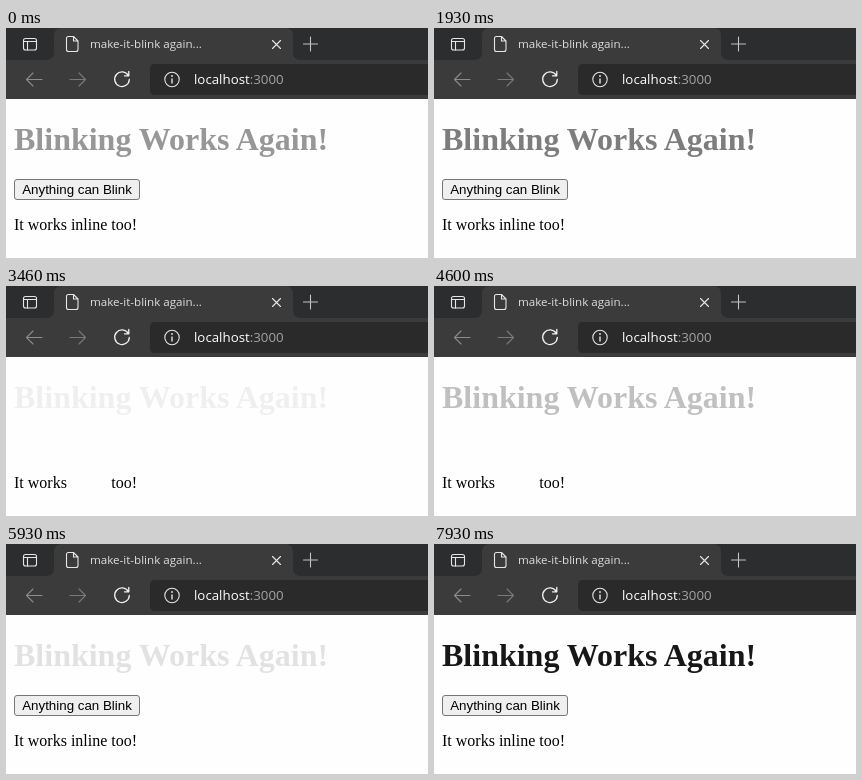
Write an HTML page that moves like this. It is 422 px wide and 230 px high and loops after 8 s.

```html
<!DOCTYPE html>
<html lang="en">
<head>
<meta charset="utf-8">
<title>make-it-blink again...</title>
<style>
  html, body { margin: 0; width: 100%; height: 100%; overflow: hidden; background: #fefefe; }
  svg { display: block; width: 422px; height: 230px; }
  .ui { font-family: "Open Sans", "Noto Sans", sans-serif; }
  .serif { font-family: "Liberation Serif", "Times New Roman", serif; }
  .sans { font-family: "Liberation Sans", Arial, sans-serif; }
  .icon { fill: none; stroke: #e6e6e6; stroke-width: 1.1; stroke-linecap: round; stroke-linejoin: round; }
</style>
</head>
<body>
<svg viewBox="0 0 422 230">
  <rect width="422" height="230" fill="#fefefe"/>

  <!-- tab strip -->
  <rect width="422" height="40" fill="#2c2d2e"/>
  <g class="icon">
    <rect x="17.5" y="10.5" width="13" height="11.5" rx="2"/>
    <path d="M17.5 13.5H30.5M21.5 13.5V22"/>
  </g>
  <path d="M40 32Q48 32 48 24V8Q48 0 56 0H279Q287 0 287 8V24Q287 32 295 32H422V71H0V32Z" fill="#3b3b3b"/>
  <g class="icon">
    <path d="M62.5 8.5H67.5L72 13V21.5Q72 23.5 70 23.5H62.5Q60.5 23.5 60.5 21.5V10.5Q60.5 8.5 62.5 8.5ZM67.5 8.5V13H72"/>
    <path d="M266.5 12.5L274.5 20.5M274.5 12.5L266.5 20.5"/>
    <path d="M304.5 9V23M297.5 16H311.5" stroke="#c4c4c4"/>
  </g>
  <text class="ui" x="84" y="20" font-size="11.6" fill="#dedede">make-it-blink again...</text>

  <!-- toolbar -->
  <path d="M422 36H149Q144 36 144 41V62Q144 67 149 67H422Z" fill="#2a2a2a"/>
  <g class="icon">
    <path d="M36 51.5H20.5M27 45L20.5 51.5L27 58" stroke="#8c8c8c"/>
    <path d="M64 51.5H79.5M73 45L79.5 51.5L73 58" stroke="#7a7a7a"/>
    <path d="M122.3 47.5A7.3 7.3 0 1 0 123.3 51.5M122.8 43.5V47.8H118.5" stroke="#f2f2f2" stroke-width="1.3"/>
    <circle cx="166" cy="51.5" r="7.2"/>
    <path d="M166 51V55" stroke-width="1.4"/>
    <circle cx="166" cy="48" r=".4"/>
  </g>
  <text class="ui" x="188" y="56" font-size="13.3" fill="#fff">localhost<tspan fill="#a3a3a3">:3000</tspan></text>

  <!-- page -->
  <text id="head" class="serif" x="8" y="122" font-size="32" font-weight="700">Blinking Works Again!</text>
  <g id="button">
    <rect x="8.5" y="151.5" width="125" height="20" rx="2.5" fill="#efefef" stroke="#767676"/>
    <text class="sans" x="71" y="166" font-size="13.333" text-anchor="middle">Anything can Blink</text>
  </g>
  <text class="serif" x="8" y="202" font-size="16">It works <tspan id="word">inline</tspan> too!</text>
</svg>
<script>
  const LOOP = 8000, FPS = 15;
  const FADE = 1250, FADE_LOW = 1000;
  const BLINK = 1000, BLINK_OFF = 125;
  const [head, button, word] = ["head", "button", "word"].map(id => document.getElementById(id));
  const mod = (a, n) => ((a % n) + n) % n;

  function draw(ms) {
    // the picture advances in steps of 1/15 s, on a 10 ms clock
    const step = Math.floor((mod(ms, LOOP) + 7) * FPS / 1000) % (LOOP * FPS / 1000);
    const t = step * 1000 / FPS;

    // heading: linear fade out and back in
    const phase = mod(t - FADE_LOW, FADE);
    head.setAttribute("opacity", Math.min(phase, FADE - phase) / (FADE / 2));

    // button and word: hard on/off
    const shown = mod(t - BLINK_OFF, BLINK) >= BLINK / 2;
    for (const el of [button, word]) el.setAttribute("visibility", shown ? "visible" : "hidden");
  }

  let start;
  function tick(now) {
    start ??= now;
    draw(now - start);
    requestAnimationFrame(tick);
  }
  draw(0);
  requestAnimationFrame(tick);
</script>
</body>
</html>
```
